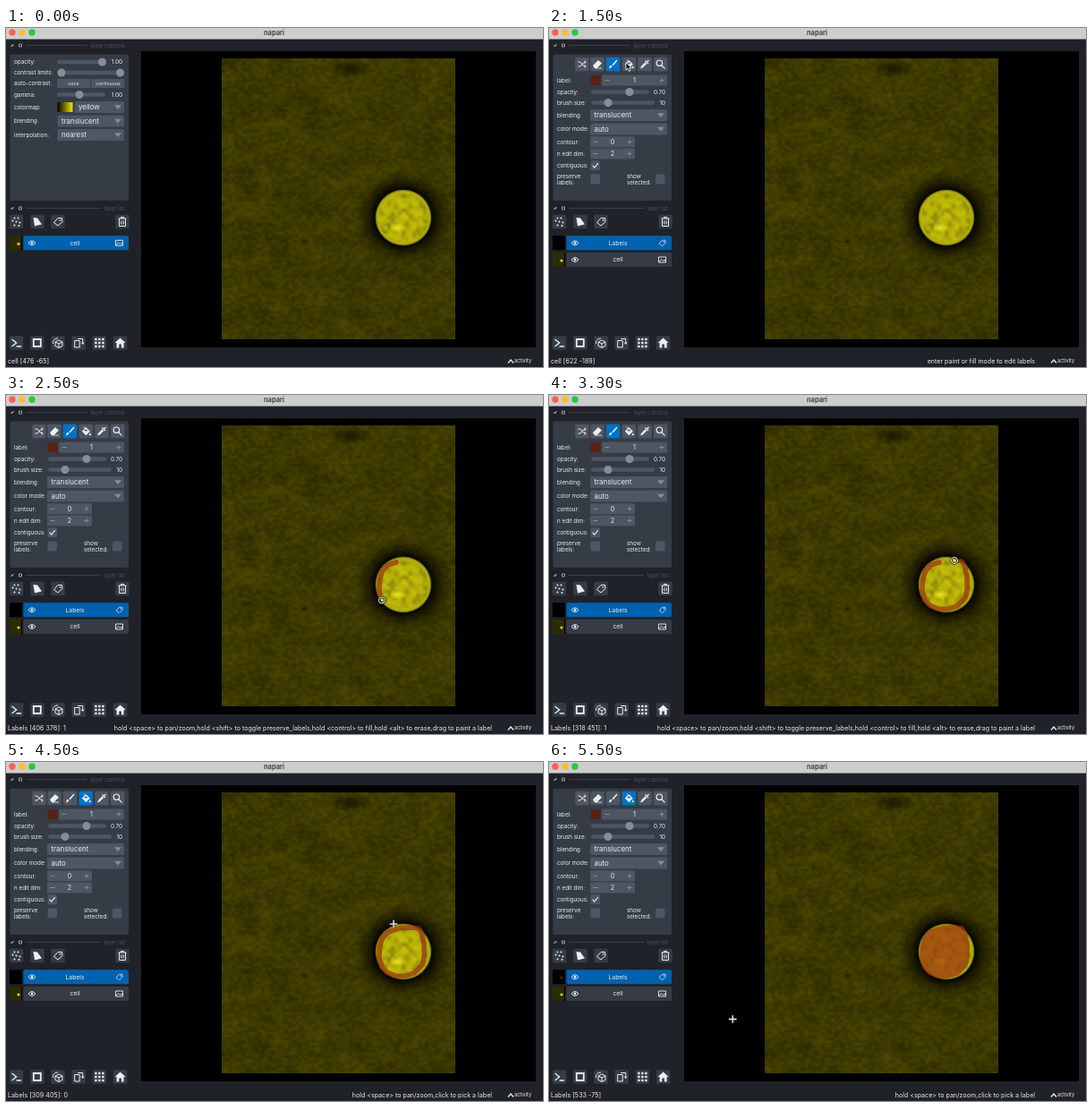
Write an HTML page with a canvas that moves like this. It is 600x379 px and loops after 5600 ms.

```html
<!DOCTYPE html>
<html lang="en">
<head>
<meta charset="utf-8">
<title>napari</title>
<style>
  html, body { margin: 0; width: 100%; height: 100%; overflow: hidden; background: #1f2228; }
  #view { position: absolute; left: 151px; top: 26px; width: 441px; height: 331px; background: #000; }
  canvas { position: absolute; left: 241px; top: 34px; }
  svg { position: absolute; left: 0; top: 0; font-family: Inter, "Open Sans", sans-serif; }
</style>
</head>
<body>
<div id="view"></div>
<canvas id="image" width="261" height="314"></canvas>
<svg id="ui" width="600" height="379" viewBox="0 0 600 379"></svg>
<script>
const PANEL = '#353c46', FIELD = '#4d5662', HANDLE = '#858d99', INK = '#eceef0', BLUE = '#0061ae', DIM = '#4b525c';
const LOOP = 5600, STEP = 100;

// ---- Microscope picture ----
let seed = 7;
const random = () => (seed = (seed * 16807) % 2147483647) / 2147483647;

function drawImage() {
  const g = document.getElementById('image').getContext('2d');
  g.fillStyle = '#3b3800';
  g.fillRect(0, 0, 261, 314);

  const grain = (x, y, w, h, cols, rows, strength) => {
    const tile = document.createElement('canvas');
    tile.width = cols; tile.height = rows;
    const tg = tile.getContext('2d');
    for (let j = 0; j < rows; j++) for (let i = 0; i < cols; i++) {
      tg.fillStyle = `rgba(${random() < .5 ? '0,0,0' : '125,118,0'},${random() * strength})`;
      tg.fillRect(i, j, 1, 1);
    }
    g.imageSmoothingQuality = 'high';
    g.drawImage(tile, x, y, w, h);
  };
  const glow = (x, y, rx, ry, stops) => {
    g.save();
    g.translate(x, y);
    g.scale(rx, ry);
    const gradient = g.createRadialGradient(0, 0, 0, 0, 0, 1);
    stops.forEach(([at, color]) => gradient.addColorStop(at, color));
    g.fillStyle = gradient;
    g.beginPath(); g.arc(0, 0, 1, 0, 7); g.fill();
    g.restore();
  };

  grain(0, 0, 261, 314, 14, 24, .14);
  grain(0, 0, 261, 314, 70, 110, .17);
  glow(144, 12, 24, 10, [[0, 'rgba(0,0,0,.5)'], [1, 'rgba(0,0,0,0)']]);
  glow(92, 205, 3, 2.5, [[0, 'rgba(0,0,0,.7)'], [1, 'rgba(0,0,0,0)']]);
  glow(203, 178, 56, 56, [[0, 'rgba(0,0,0,.95)'], [.57, 'rgba(0,0,0,.9)'], [.68, 'rgba(0,0,0,.55)'],
    [.82, 'rgba(0,0,0,.24)'], [1, 'rgba(0,0,0,0)']]);
  glow(203, 178, 31.5, 31.5, [[0, '#d0c90c'], [.6, '#c4be08'], [.86, '#c1bc0c'], [.94, '#a9a60c'], [1, '#3f4200']]);
  g.save();
  g.beginPath(); g.arc(203, 178, 28, 0, 7); g.clip();
  grain(173, 148, 60, 60, 15, 15, .32);
  glow(196, 189, 8, 6, [[0, 'rgba(245,238,40,.9)'], [1, 'rgba(240,230,30,0)']]);
  g.restore();
}

// ---- Interface pieces ----
const rect = (x, y, w, h, fill, r = 1.5) => `<rect x="${x}" y="${y}" width="${w}" height="${h}" rx="${r}" fill="${fill}"/>`;
const dot = (x, y, r, fill) => `<circle cx="${x}" cy="${y}" r="${r}" fill="${fill}"/>`;
const text = (x, y, s, size = 6.3, anchor = 'start', extra = '') =>
  `<text x="${x}" y="${y + size * .36}" font-size="${size}" text-anchor="${anchor}" fill="${INK}" ${extra}>${s}</text>`;
const line = (x, y, d, color = INK, width = 1) =>
  `<path transform="translate(${x} ${y})" d="${d}" fill="none" stroke="${color}" stroke-width="${width}"/>`;
const shape = (x, y, d, fill = INK) => `<path transform="translate(${x} ${y})" d="${d}" fill="${fill}" fill-rule="evenodd"/>`;
const row = (y, label) => text(9, y, label);
const slider = (x, y, w, ...handles) => rect(x, y - 2.3, w, 4.6, FIELD, 2.3) + handles.map(h => dot(h, y, 4.5, HANDLE)).join('');
const combo = (x, y, value) => rect(x, y - 6.5, 132 - x, 13, FIELD) + text(x + 4.5, y, value, 7.9) +
  shape(125, y, 'M-4-2.3H4L0 2.5Z', HANDLE);
const spin = (y, right, value) => {
  const left = right > 100 ? 59 : 46;
  return rect(left, y - 6, right - left, 12, FIELD) + line(left + 6, y, 'M-2.5 0H2.5', HANDLE) +
    line(right - 6, y, 'M-2.5 0H2.5M0-2.5V2.5', HANDLE) + text((left + right) / 2, y, value, 7.2, 'middle');
};
const check = (x, y) => rect(x, y - 5.5, 10.5, 11, FIELD);
const button = (x, y, fill = FIELD) => rect(x - 7.7, y - 7.7, 15.4, 15.4, fill);

const ICON = {
  points: (x, y) => [[0, 0], [-4, -1], [4, 1], [-2, 4], [2, -4], [-2, -4], [3, 4.5]].map(([a, b]) => dot(x + a, y + b, 1, INK)).join(''),
  polygon: (x, y) => shape(x, y, 'M-4.5-4.5L0-4 5 3-3 5Z'),
  tag: (x, y) => line(x, y, 'M-4.5 1L0-4 4.5-4 5 0 0 4.5Z') + dot(x + 2.5, y - 1.7, .9, INK),
  trash: (x, y) => line(x, y, 'M-4.5-3.5H4.5M-1.5-3.5V-5H1.5V-3.5M-3.5-3.5V5H3.5V-3.5M-1.2-1V3M1.2-1V3'),
  shuffle: (x, y) => line(x, y, 'M-4.5-2.5H-3C0-2.5 0 2.5 4 2.5M-4.5 2.5H-3C0 2.5 0-2.5 4-2.5M2.5-4.2L4.3-2.5 2.5-.8M2.5.8L4.3 2.5 2.5 4.2'),
  eraser: (x, y) => shape(x, y, 'M-5 1.5L1-4.5 5-1-.5 4.5H-3Z') + line(x, y, 'M-3 4.5H5', INK, .8),
  brush: (x, y) => shape(x, y, 'M-4.5 4.8C-4 2-3 .8-1.5 1.6-.4 3-2 4.6-4.5 4.8ZM-1 .5L4-5 5-4 .2 1.8Z'),
  bucket: (x, y) => shape(x, y, 'M-4.5 0L0-4.5 4.5 0 0 4.8ZM-2.5-.3H2.3L0-2.5ZM4.5 1.5L5.8 4.5H3.2Z') + line(x, y, 'M-2.5-5L0-2', INK, .9),
  picker: (x, y) => shape(x, y, 'M-4.8 4.8L-4 2.3.5-2.2 2.2-.5-2.3 4ZM0-3.5L1-4.4 4.4-1 3.5 0ZM2-3L4-5 5-4 3-2Z'),
  zoom: (x, y) => line(x, y, 'M-4.5-1.3A3.2 3.2 0 1 0 1.9-1.3A3.2 3.2 0 1 0-4.5-1.3M1 1L4.8 4.8', INK, 1.2),
  console: (x, y) => line(x, y, 'M-5-4L0 0-5 4M0 4H5.5', INK, 1.4),
  square: (x, y) => line(x, y, 'M-4-4H4V4H-4Z', INK, 1.8),
  cube: (x, y) => line(x, y, 'M-3-1L1-3 5-1V3.5L1 5.5-3 3.5ZM-3-1L1 1 5-1M1 1V5.5M-5.5 1C-6-3-3-5 0-5'),
  transpose: (x, y) => line(x, y, 'M-4.5-2.5H1V5H-4.5ZM-1-4.5H4.5V1M2.8-.5L4.5 1.5 6-.5'),
  grid: (x, y) => [-4, 0, 4].flatMap(a => [-4, 0, 4].map(b => rect(x + a - 1.2, y + b - 1.2, 2.4, 2.4, INK, 0))).join(''),
  home: (x, y) => shape(x, y, 'M-6 0L0-5.5 6 0H4V5.5H1.3V1.5H-1.3V5.5H-4V0Z')
};
const TOOLS = [['shuffle', 37], ['eraser', 54], ['brush', 71.5], ['bucket', 89.3], ['picker', 107], ['zoom', 124.7]];

const dockTitle = (y, label, end) => line(7, y, 'M-2 1L2-1M0-1V1.4', '#a9aeb5', .9) + line(16, y, 'M-1.5-1.5H1.5V1.5H-1.5Z', '#a9aeb5', .9) +
  line(22, y, `M0 0H${end - 22}`, DIM, .6) + text(133, y, label, 6, 'end', `style="fill:${DIM}"`);

const thumbnail = y => rect(4, y - 8, 14, 16, '#2e2b00', 0) + dot(14, y + 1, 1.6, '#d8d020') + rect(17, y - 8, 1, 16, '#000', 0);
const layerRow = (y, name, selected, isImage) => rect(19.5, y - 8, 117.5, 16, selected ? BLUE : PANEL) +
  line(29, y, 'M-4 0Q0-5 4 0Q0 5-4 0Z', INK, .9) + dot(29, y, 1.4, INK) + text(77, y, name, 6.8, 'middle') +
  (isImage ? line(126.5, y, 'M-4-3H4V3H-4ZM-3.5 2.5L-1-.5 1 1.5 2.5 0 4 2', INK, .9)
           : `<g transform="translate(126.5 ${y}) scale(.75)">${ICON.tag(0, 0)}</g>`);

const imageControls = () =>
  row(38, 'opacity:') + slider(57, 38, 54, 107.5) + text(130, 38, '1.00', 6.4, 'end') +
  row(50, 'contrast limits:') + slider(57, 50, 75, 62, 127.5) +
  row(62, 'auto-contrast:') + rect(57, 57, 37.3, 10, FIELD) + rect(95.3, 57, 37, 10, FIELD) +
  text(75.5, 62, 'once', 5.3, 'middle') + text(114, 62, 'continuous', 5.3, 'middle') +
  row(74.5, 'gamma:') + slider(57, 74.5, 54, 82) + text(130, 74.5, '1.00', 6.4, 'end') +
  row(88.5, 'colormap:') + rect(57.5, 83, 17, 11, 'url(#ramp)', 0) + combo(76.5, 88.5, 'yellow') +
  row(104, 'blending:') + combo(57.5, 104, 'translucent') +
  row(119.5, 'interpolation:') + combo(57.5, 119.5, 'nearest');

const labelControls = () =>
  TOOLS.map(([name, x]) => button(x, 40.5) + `<rect id="on-${name}" x="${x - 7.7}" y="32.8" width="15.4" height="15.4" rx="1.5" fill="#0070c4"/>` + ICON[name](x, 40.5)).join('') +
  row(58.5, 'label:') + rect(46.5, 53, 11, 11, '#5a2115', 0) + spin(58.5, 132, 1) +
  row(71.5, 'opacity:') + slider(47, 71.5, 65, 90) + text(130, 71.5, '0.70', 6.3, 'end') +
  row(83.5, 'brush size:') + slider(47, 83.5, 71, 66) + text(130, 83.5, '10', 6.3, 'end') +
  row(97.5, 'blending:') + combo(46, 97.5, 'translucent') +
  row(113, 'color mode:') + combo(46, 113, 'auto') +
  row(127.3, 'contour:') + spin(127.3, 96, 0) +
  row(140.5, 'n edit dim:') + spin(140.5, 96, 2) +
  row(153.7, 'contiguous:') + check(46.5, 153.7) + line(51.7, 153.7, 'M-3 0L-1 2.5 3.2-2.5', INK, 1.1) +
  row(166, 'preserve') + row(172.3, 'labels:') + check(46.5, 169) +
  text(87, 166, 'show') + text(87, 172.3, 'selected:') + check(119, 169);

drawImage();
document.getElementById('ui').innerHTML = `
  <defs><linearGradient id="ramp"><stop stop-color="#000"/><stop offset="1" stop-color="#f2e600"/></linearGradient></defs>` +
  rect(0, 0, 600, 12.5, '#cecdce', 0) + dot(7, 5, 3.7, '#ff5f57') + dot(18, 5, 3.7, '#febc2e') + dot(29, 5, 3.7, '#28c840') +
  text(299.5, 5.3, 'napari', 7.6, 'middle', 'font-weight="600" style="fill:#3a3a3a"') +
  dockTitle(19.5, 'layer controls', 91) + rect(4.5, 29.5, 132.5, 163.5, PANEL, 2) +
  `<g id="imageControls">${imageControls()}</g><g id="labelControls">${labelControls()}</g>` +
  dockTitle(201.5, 'layer list', 106) +
  button(11.5, 216.5, PANEL) + button(35, 216.5, PANEL) + button(58, 216.5, PANEL) + button(130, 216.5, PANEL) +
  `<g id="hover">${button(58, 216.5, '#69727e')}</g>` +
  ICON.points(11.5, 216.5) + ICON.polygon(35, 216.5) + ICON.tag(58, 216.5) + ICON.trash(130, 216.5) +
  `<g id="single">${thumbnail(240.3) + layerRow(240.3, 'cell', true, true)}</g>` +
  `<g id="double">${rect(4, 232.3, 14, 16, '#000', 0) + layerRow(240.3, 'Labels', true, false) + thumbnail(259) + layerRow(259, 'cell', false, true)}</g>` +
  `<g id="thumbFill">${dot(14, 241, 1.6, '#5a2115')}</g>` +
  ['console', 'square', 'cube', 'transpose', 'grid', 'home'].map((name, i) => button(11.6 + i * 23.2, 352, PANEL) + ICON[name](11.6 + i * 23.2, 352)).join('') +
  text(2, 372, '', 7.2, 'start', 'id="status"') + text(543, 372, '', 7.1, 'end', 'id="help"') +
  line(564, 372.5, 'M-3 2L0-1.5 3 2', INK, 1.3) + text(568, 372, 'activity', 5.6) +
  `<polyline id="ink" stroke="#9c3412" stroke-width="5.6" stroke-linejoin="round" stroke-linecap="round" opacity=".72"/>` +
  `<g id="arrow"><path d="M0 0V8.6L2-.0 2 6.8 3.4 9.8 4.8 9.2 3.5 6.3H6.2Z" fill="none"/><path d="M0 0V8.4L2 6.6 3.5 9.9 5 9.2 3.5 6.1H6.2Z" fill="#000" stroke="#fff" stroke-width=".8"/></g>` +
  `<g id="ring"><circle r="3.6" fill="none" stroke="#111" stroke-width="2.2"/><circle r="3.6" fill="none" stroke="#eee" stroke-width="1"/><circle r="1.2" fill="#ddd"/></g>` +
  `<g id="cross"><path d="M-4.5 0H4.5M0-4.5V4.5" stroke="#333" stroke-width="2.4"/><path d="M-4.3 0H4.3M0-4.3V4.3" stroke="#eee" stroke-width="1.3"/></g>`;

// ---- Timeline ----
const ADD_LABELS = 400, PICK_BRUSH = 1300, PAINT = 2000, PAINT_END = 3460, PICK_FILL = 4300, FILL = 4700;
const KEYS = [ // time, x, y of the pointer
  [0, 210.2, 260.3], [80, 151.4, 329.6], [200, 95, 285], [350, 59, 219], [700, 59, 219], [900, 64, 150], [1150, 71, 42],
  [1350, 72, 42], [1500, 86, 38.5], [1600, 190, 70], [1800, 420, 175], [1900, 436, 186],
  [2000, 436, 187], [2100, 427, 190], [2200, 420.5, 197], [2300, 417.5, 207], [2400, 417, 218.5], [2500, 420, 229.4],
  [2600, 426, 235.5], [2700, 435, 239], [2800, 446, 239.2], [2900, 456, 236], [3000, 465, 227], [3060, 467.3, 216],
  [3120, 467, 203], [3180, 464.5, 191], [3220, 461, 186], [3300, 453, 185], [3400, 442, 185.5], [3460, 436, 187],
  [3600, 350, 48], [3800, 200, 9], [4000, 106, 30], [4200, 87, 39], [4300, 87, 39],
  [4450, 433.1, 181.1], [4500, 433.1, 181.1], [4650, 444, 214], [4900, 444, 214], [5300, 205.2, 287.5], [5600, 205.2, 287.5]
];

function pointer(t) {
  const i = Math.max(1, KEYS.findIndex(key => key[0] >= t));
  const [t0, x0, y0] = KEYS[i - 1], [t1, x1, y1] = KEYS[i];
  const p = Math.max(0, (t - t0) / (t1 - t0));
  return [x0 + (x1 - x0) * p, y0 + (y1 - y0) * p];
}
const inView = ([x, y]) => x >= 151 && x < 592 && y >= 26 && y < 357;

function inkPoints(t) {
  const end = Math.min(t >= PAINT_END ? PAINT_END : t - 65, PAINT_END);
  if (end < PAINT) return '';
  return [...KEYS.filter(key => key[0] >= PAINT && key[0] < end).map(key => key.slice(1)), pointer(end)].join(' ');
}

// The status line keeps the last position seen over the view.
let lastStatus = '';
const STATUS = Array.from({ length: LOOP / STEP }, (_, i) => {
  const t = i * STEP, [x, y] = pointer(t - 20);
  if (inView([x, y])) {
    const inImage = x > 241 && x < 502 && y > 34 && y < 348;
    const onLabel = (t >= PAINT && t <= PAINT_END) || (t >= FILL && Math.hypot(x - 442, y - 212) < 28);
    const value = t > ADD_LABELS && inImage ? ': ' + Number(onLabel) : '';
    lastStatus = `${t < ADD_LABELS ? 'cell' : 'Labels'} [${Math.round((y - 34.5) * 2.108)} ${Math.round((x - 241) * 2.108)}]${value}`;
  }
  return lastStatus;
});

const HELP = [
  [4400, 'hold <space> to pan/zoom,click to pick a label'],
  [1600, 'hold <space> to pan/zoom,hold <shift> to toggle preserve_labels,hold <control> to fill,hold <alt> to erase,drag to paint a label'],
  [ADD_LABELS, 'enter paint or fill mode to edit labels'],
  [0, '']
];

const $ = id => document.getElementById(id);
const show = (id, on) => $(id).style.display = on ? '' : 'none';

function render(now) {
  const t = Math.floor(now % LOOP / STEP) * STEP;
  const at = pointer(t), labels = t >= ADD_LABELS;
  const tool = t >= PICK_FILL ? 'bucket' : t >= PICK_BRUSH ? 'brush' : 'zoom';
  const cursor = !inView(at) || tool === 'zoom' ? 'arrow' : tool === 'brush' ? 'ring' : 'cross';

  show('imageControls', !labels);
  show('labelControls', labels);
  show('single', !labels);
  show('double', labels);
  show('thumbFill', t >= FILL);
  show('hover', Math.abs(at[0] - 58) < 8 && Math.abs(at[1] - 216.5) < 8);
  TOOLS.forEach(([name]) => show('on-' + name, name === tool));

  for (const id of ['arrow', 'ring', 'cross']) show(id, id === cursor && t > 0);
  $(cursor).setAttribute('transform', `translate(${at})`);
  $('ink').setAttribute('points', inkPoints(t));
  $('ink').setAttribute('fill', t >= FILL ? '#9c3412' : 'none');
  $('status').textContent = STATUS[t / STEP];
  $('help').textContent = HELP.find(([from]) => t >= from)[1];
}

let start;
function tick(now) {
  start ??= now;
  render(now - start);
  requestAnimationFrame(tick);
}
render(0);
requestAnimationFrame(tick);
</script>
</body>
</html>
```
